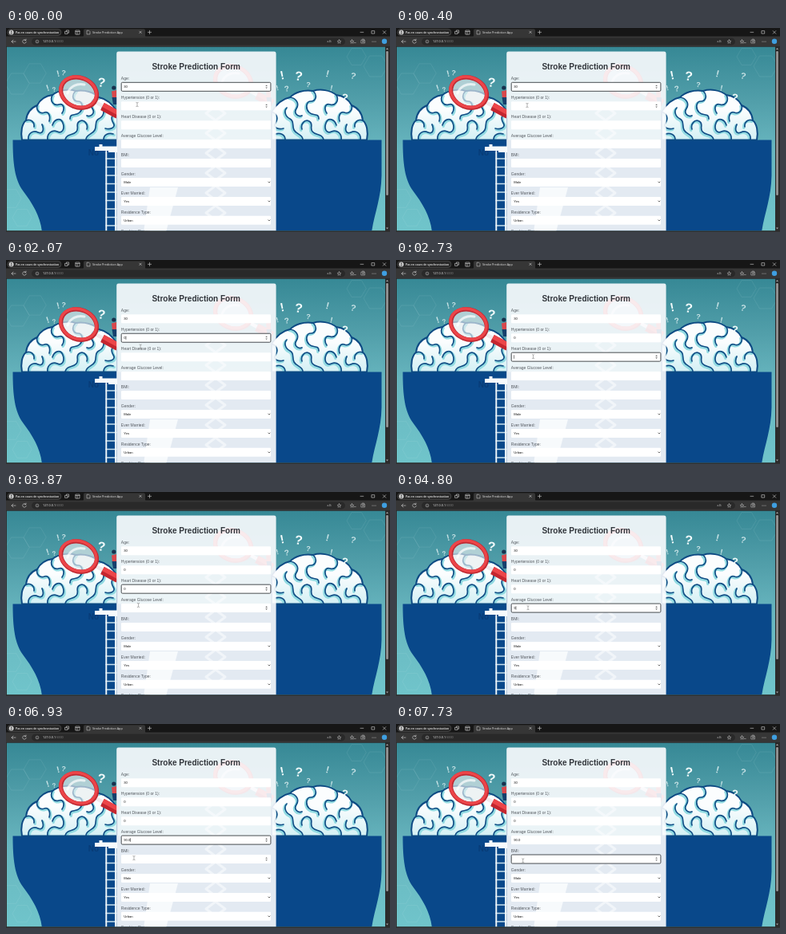
These frames come from a looping animation (480 by 256 pixels, 8000 ms). An HTML page:

```html
<!DOCTYPE html>
<html lang="en">
<head>
<meta charset="utf-8">
<title>Stroke Prediction App</title>
<style>
html, body { margin: 0; width: 100%; height: 100%; overflow: hidden; background: #161616; }
svg { display: block; width: 100vw; height: 100vh; }
text { white-space: pre; }
.ui { font-family: "Open Sans", sans-serif; }
.form { font-family: "Liberation Sans", Arial, sans-serif; }
.line { fill: none; stroke-linecap: round; stroke-linejoin: round; }
</style>
</head>
<body>
<svg viewBox="0 0 480 256" xmlns="http://www.w3.org/2000/svg">
<defs>
  <linearGradient id="sky" x1="0" y1="0" x2="0" y2="1">
    <stop offset="0" stop-color="#368895"/>
    <stop offset=".3" stop-color="#529faa"/>
    <stop offset=".55" stop-color="#68b6bf"/>
    <stop offset="1" stop-color="#70c5cb"/>
  </linearGradient>
  <linearGradient id="lobe" x1="0" y1="0" x2="0" y2="1">
    <stop offset=".4" stop-color="#fbfdfe"/>
    <stop offset="1" stop-color="#d3f0f4"/>
  </linearGradient>
  <clipPath id="page"><rect x="1" y="23.5" width="473" height="231"/></clipPath>
  <path id="dome" d="M20 140.5C18 130 20 120 25 116C26 106 32 100 39 97C43 89 51 85 58 84C66 78 78 76 87 79C99 77 110 81 116 87C126 89 134 97 139 105V140.5Z"/>
  <clipPath id="inside"><use href="#dome"/></clipPath>
  <path id="folds" d="M25 116C31 114 36 118 35 124M28 140C27 132 34 128 40 131S48 127 45 121M39 97C37 104 43 108 48 106S56 110 54 117M58 84C54 92 60 98 66 96S74 101 70 107M52 140C51 132 58 127 64 130S74 127 71 119S60 115 58 122M87 79C81 85 84 92 90 92S97 101 92 106S80 106 80 114M74 140C76 132 84 135 88 130S86 120 92 117S103 121 101 127M116 87C108 88 104 95 108 101S106 112 101 110M100 140C100 133 108 134 111 128S110 117 116 114S124 104 120 100M139 105C133 107 130 113 134 119S130 128 124 126M122 140C122 134 128 131 134 133"/>
  <g id="brain">
    <use href="#dome" fill="url(#lobe)"/>
    <g clip-path="url(#inside)" class="line">
      <use href="#folds" x="1.2" y="1.4" stroke="#93dbe2" stroke-width="3.2"/>
      <use href="#folds" stroke="#124f86" stroke-width="1.7"/>
    </g>
    <use href="#dome" class="line" stroke="#0d4a83" stroke-width="2"/>
  </g>
  <g id="glass">
    <path d="M110 92L122 98.5" stroke="#f1e9ec" stroke-width="4.5"/>
    <path d="M120.5 98.5L140 109" stroke="#c4262f" stroke-width="10"/>
    <path d="M121.5 96.5L141 107" stroke="#ec4549" stroke-width="5.5"/>
    <ellipse cx="91" cy="81" rx="23" ry="18.5" transform="rotate(22 91 81)" fill="#e9eef0" fill-opacity=".65" stroke="#bf2932" stroke-width="5.4"/>
    <ellipse cx="90.5" cy="80.2" rx="23" ry="18.5" transform="rotate(22 90.5 80.2)" fill="none" stroke="#ec4549" stroke-width="3.6"/>
    <path d="M77 82C80 73 89 69 98 71" class="line" stroke="#fff" stroke-opacity=".7" stroke-width="3"/>
  </g>
</defs>

<g clip-path="url(#page)">
  <rect y="23" width="480" height="233" fill="url(#sky)"/>
  <g id="hexes" class="line" stroke="#d8f2f4" stroke-opacity=".13" stroke-width=".7"></g>
  <path d="M8.5 140.5H469.5V185C469 213 461 231 457 256H45C43 236 33 220 21 204C11 190 8.5 170 8.5 140.5Z" fill="#09488a"/>
  <path d="M180 200H215L200 256H172Z" fill="#d6e9f0"/>
  <use href="#brain"/>
  <use href="#brain" transform="matrix(-1 0 0 1 471 0)"/>
  <g id="marks" class="form" font-weight="700" fill="#f2fbfb" text-anchor="middle"></g>
  <use href="#glass"/>
  <use href="#glass" transform="translate(193 -14)"/>
  <g id="person">
    <circle cx="134.8" cy="75" r="2.6" fill="#17304d"/>
    <path d="M132 79.5L138 78V88H133Z" fill="#d8474b"/>
    <path d="M132.5 87H139V96H134Z" fill="#153f6c"/>
  </g>
  <use href="#person" transform="translate(193 0)"/>
  <text x="109.5" y="159.5" class="form" font-size="10" font-weight="700" fill="#083c77" text-anchor="middle">No</text>
  <path d="M111 149H116.5V146H120.5V148.5H139V156H128V154H111Z" fill="#f7fafc"/>
  <g id="ladder" class="line"></g>
  <g id="deco" class="line" stroke="#fff" stroke-opacity=".6" stroke-width="3"></g>

  <path d="M138.2 256V32Q138.2 29.6 140.6 29.6H335.2Q337.6 29.6 337.6 32V256Z" fill="#fbfcfe" fill-opacity=".9"/>
  <text x="237.7" y="51.5" class="form" font-size="10" font-weight="700" fill="#30343a" text-anchor="middle">Stroke Prediction Form</text>
  <g id="form" class="form"></g>
  <path id="mouse" class="line" stroke="#6a6a6a" stroke-width=".5" d="M-1.2-2.6Q0-2.6 0-2V2Q0 2.6-1.2 2.6M1.2-2.6Q0-2.6 0-2M0 2Q0 2.6 1.2 2.6"/>
</g>

<g class="ui">
  <rect width="480" height="11" fill="#161616"/>
  <rect y="10.5" width="480" height="13" fill="#363636"/>
  <rect x="2" y="1.4" width="67" height="8" rx="4" fill="#292929" stroke="#777" stroke-width=".4"/>
  <circle cx="6.7" cy="5.4" r="2.9" fill="#d8d8d8"/>
  <circle cx="6.7" cy="4.5" r="1" fill="#555"/>
  <path d="M4.9 7.2Q6.7 4.6 8.5 7.2Z" fill="#555"/>
  <text x="12" y="6.7" font-size="3.5" font-weight="600" fill="#f0f0f0">Pas en cours de synchronisation</text>
  <path d="M96 11Q97 11 97 9.5V3Q97 1.2 99 1.2H172Q174 1.2 174 3V9.5Q174 11 175 11Z" fill="#363636"/>
  <path d="M101 3.2H103.6L105 4.6V7.8H101Z" fill="none" stroke="#ddd" stroke-width=".5"/>
  <text x="108" y="6.7" font-size="3.75" fill="#eee">Stroke Prediction App</text>
  <g class="line" stroke="#d6d6d6" stroke-width=".6">
    <path d="M74 4.3H77V7.3H74ZM75.4 4.2V2.9H78.6V6.1H77M87.2 3H92V8H87.2ZM87.2 4.5H92M89 4.5V8"/>
    <path d="M166.8 4.1L169.2 6.5M169.2 4.1L166.8 6.5M177.4 5.3H181.6M179.5 3.2V7.4"/>
    <path d="M443 5.3H446.8M457.3 3.6H460.7V7H457.3ZM471.2 3.6L474.8 7.2M474.8 3.6L471.2 7.2"/>
    <path d="M7 17H12M9 15L7 17L9 19M24.8 15.4A2.3 2.3 0 1 0 25.3 17.4M25 14V15.6H23.3"/>
  </g>
  <rect x="32" y="12.6" width="392" height="8.8" rx="4.4" fill="#292929"/>
  <circle cx="39" cy="17" r="1.9" fill="none" stroke="#ccc" stroke-width=".5"/>
  <path d="M39 16.8V18M39 15.8V16.1" stroke="#ccc" stroke-width=".5"/>
  <text x="46" y="18.4" font-size="3.8" fill="#f0f0f0">127.0.0.1<tspan fill="#888">:5000</tspan></text>
  <text x="401.2" y="18.3" font-size="3.8" fill="#a8a8a8">aあ</text>
  <g class="line" stroke="#ccc" stroke-width=".5">
    <path id="star" d="M416.5 14.7L417.2 16.3L418.9 16.4L417.6 17.5L418 19.2L416.5 18.3L415 19.2L415.4 17.5L414.1 16.4L415.8 16.3Z"/>
    <use href="#star" x="16"/>
    <path d="M435 18.5H437.2M444.2 15.2H448.5V19H444.2ZM445.2 15V14H447.5V15.2M446.4 16.2V18M445.5 17.1H447.3"/>
  </g>
  <g fill="#ccc"><circle cx="458" cy="17" r=".5"/><circle cx="460" cy="17" r=".5"/><circle cx="462" cy="17" r=".5"/></g>
  <circle cx="473" cy="16.8" r="3.2" fill="#3f9fe0"/>
  <rect y="23.5" width="1" height="232.5" fill="#303030"/>
  <rect x="474" y="23.5" width="6" height="232.5" fill="#2b2b2b"/>
  <rect x="475.2" y="29" width="2.6" height="181" rx="1.3" fill="#9b9b9b"/>
  <path d="M475 27L476.5 25L478 27ZM475 250.5L476.5 252.5L478 250.5Z" fill="#a5a5a5"/>
  <rect y="254.6" width="480" height="1.4" fill="#303030"/>
</g>
</svg>
<script>
const LOOP = 8000, BLINK = 530, ROW = 23.93;
const $ = id => document.getElementById(id);
function add(parent, tag, attrs, text) {
  const el = document.createElementNS("http://www.w3.org/2000/svg", tag);
  for (const k in attrs) el.setAttribute(k, attrs[k]);
  if (text) el.textContent = text;
  return parent.appendChild(el);
}

// Scenery
for (const [x, y, r] of [[14, 70, 15], [36, 57, 14], [6, 214, 13], [20, 238, 12], [462, 48, 15], [438, 36, 12]]) {
  let d = "";
  for (let i = 0; i < 6; i++) {
    const a = i * Math.PI / 3;
    d += (i ? "L" : "M") + (x + r * Math.cos(a)).toFixed(1) + " " + (y + r * Math.sin(a)).toFixed(1);
  }
  add($("hexes"), "path", { d: d + "Z" });
}
for (const [ch, x, y, size, tilt] of [
  ["!", 52, 75, 11, -18], ["?", 60, 77, 8, -12], ["!", 65, 57, 11, -14], ["?", 72, 56, 9, 10],
  ["?", 119.5, 68, 16, 8], ["!", 345, 59, 15, -12], ["!", 339, 75, 9, -15],
  ["?", 351, 76, 10, -10], ["?", 366, 60, 16, 8], ["?", 378, 71, 9, 8],
  ["!", 402, 57, 12, 14], ["!", 407, 75, 10, 12], ["?", 423.5, 87, 13, 12], ["?", 434, 60, 11, 16]
]) add($("marks"), "text", {
  x, y: y + size * .36, "font-size": size, "fill-opacity": size > 12 ? 1 : .75, transform: `rotate(${tilt} ${x} ${y})`
}, ch);

for (let y = 164; y < 256; y += 10.5)
  add($("ladder"), "path", { d: `M125 ${y}H138`, stroke: "#c8dfec", "stroke-width": 1.4 });
for (const x of [125.3, 137])
  add($("ladder"), "path", { d: `M${x} 155V256`, stroke: "#f2f8fb", "stroke-width": 1.9 });
for (let i = 0; i < 6; i++) {
  const y = 107 + i * 25;
  add($("deco"), "path", { d: `M250 ${y}L262 ${y - 9}L274 ${y}L262 ${y + 9}Z` });
}

// Form rows: label, fixed select value
const rows = [["Age:"], ["Hypertension (0 or 1):"], ["Heart Disease (0 or 1):"], ["Average Glucose Level:"], ["BMI:"],
  ["Gender:", "Male"], ["Ever Married:", "Yes"], ["Residence Type:", "Urban"], ["Smoking Status:", ""]];
const fields = rows.map(([label, value], i) => {
  const y = 73.8 + i * ROW, g = $("form");
  add(g, "text", { x: 143.8, y: y - 8.4, "font-size": 5, fill: "#54595f" }, label);
  add(g, "rect", { x: 144, y: y - 5.5, width: 187, height: 11, rx: 1.2, fill: "#fff" });
  const text = add(g, "text", { x: 147.3, y: y + 1.5, "font-size": 4.17, fill: "#111" }, value);
  if (value !== undefined) {
    add(g, "path", { d: `M327.8 ${y - .4}L328.9 ${y + .7}L330 ${y - .4}`, class: "line", stroke: "#222", "stroke-width": .7 });
    return { y, text };
  }
  const spin = add(g, "path", { d: `M324.3 ${y - .7}L325.6 ${y - 2.3}L326.9 ${y - .7}ZM324.3 ${y + .7}L325.6 ${y + 2.3}L326.9 ${y + .7}Z`, fill: "#666" });
  return { y, text, spin };
});
const ring = add($("form"), "rect", { x: 144.2, width: 186.7, height: 11, rx: 1.3, fill: "none", stroke: "#34383d", "stroke-width": .9 });
const caret = add($("form"), "rect", { width: .5, height: 4.6, fill: "#111" });

// time, row, value
const edits = [[-600, 0, "30"], [500, 1, ""], [1000, 1, "0"], [2400, 2, ""], [3000, 2, "0"], [4150, 3, ""],
  [4600, 3, "9"], [5300, 3, "90"], [5500, 3, "90."], [5800, 3, "90.0"], [7190, 4, ""]];
// time, x, y
const path = [[0, 164, 96], [400, 164, 97], [1150, 166, 100], [1850, 166, 101], [2380, 171.5, 121.2], [3250, 171.5, 121.2],
  [3800, 165.5, 141.5], [4120, 165, 145.3], [6200, 165, 145.3], [6900, 160, 168], [7180, 158.7, 171.5], [LOOP, 158.7, 171.5]];

function mouseAt(t) {
  const i = Math.max(1, path.findIndex(p => p[0] > t));
  const [t0, x0, y0] = path[i - 1], [t1, x1, y1] = path[i];
  const u = (t - t0) / (t1 - t0), e = u * u * (3 - 2 * u);
  return [x0 + (x1 - x0) * e, y0 + (y1 - y0) * e];
}

function draw(t) {
  const values = ["", "", "", "", ""];
  let since = 0, focus = 0;
  for (const [at, row, value] of edits) if (at <= t) {
    values[row] = value;
    since = at;
    focus = row;
  }
  const [mx, my] = mouseAt(t);
  values.forEach((v, i) => {
    const f = fields[i];
    if (f.text.textContent !== v) f.text.textContent = v;
    const hover = Math.abs(my - f.y) < 5.7;
    f.spin.setAttribute("visibility", i === focus || hover ? "visible" : "hidden");
  });
  const f = fields[focus];
  ring.setAttribute("y", f.y - 5.5);
  caret.setAttribute("x", 147.4 + (values[focus] ? f.text.getComputedTextLength() : 0));
  caret.setAttribute("y", f.y - 2.4);
  caret.setAttribute("visibility", Math.floor((t - since) / BLINK) % 2 ? "hidden" : "visible");
  $("mouse").setAttribute("transform", `translate(${mx.toFixed(2)} ${my.toFixed(2)})`);
}

const start = performance.now();
function tick() {
  draw((performance.now() - start) % LOOP);
  requestAnimationFrame(tick);
}
tick();
</script>
</body>
</html>
```
